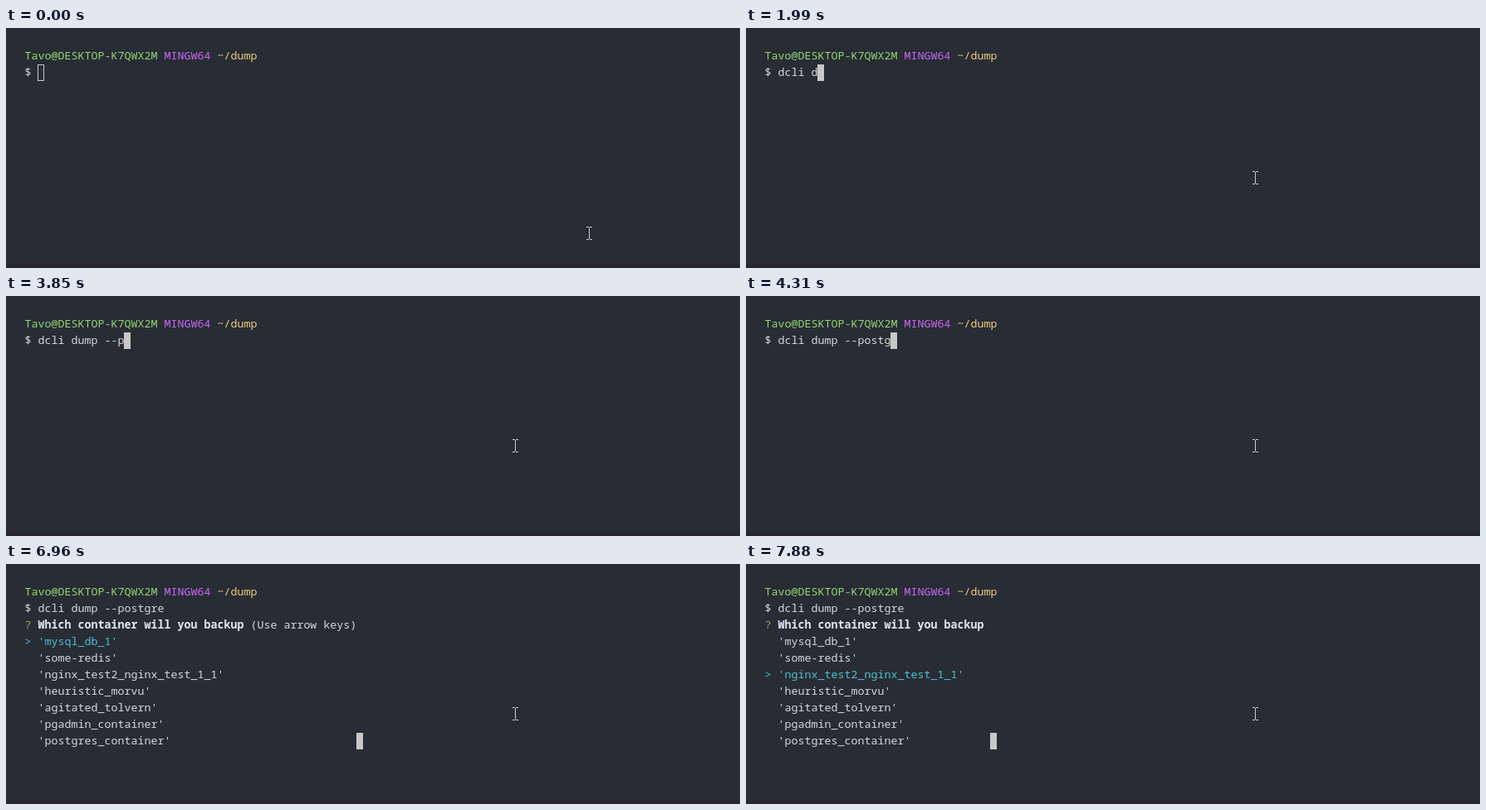
An HTML page for the animation above (8000 ms loop, 884x290 px).

```html
<!DOCTYPE html>
<html lang="en">
<head>
<meta charset="utf-8">
<title>Terminal backup prompt</title>
<style>
  html, body { margin: 0; width: 100%; height: 100%; overflow: hidden; background: #282c34; }
  #stage { position: relative; width: 884px; height: 290px; overflow: hidden; background: #282c34; }
  #stage::after { content: ""; position: absolute; inset: 286px 0 0; background: #26252e; }
  pre {
    position: absolute; left: 22.5px; top: 23px; margin: 0; color: #d8d8d8;
    font: 500 13.3333px/20px "Noto Sans Mono", "DejaVu Sans Mono", monospace;
    font-variant-ligatures: none;
  }
  b { color: #e2e6f4; }
  .user { color: #94d674; }
  .shell { color: #cc68f8; }
  .path { color: #f0cb7c; }
  .mark { color: #a0a078; }
  .active { color: #50bfd4; }
  #caret { position: absolute; width: 8px; height: 20px; box-sizing: border-box; border: 1px solid #c8c8c8; }
  #caret.focused { background: #c8c8c8; }
  #mouse { position: absolute; left: -3px; top: -8px; }
</style>
</head>
<body>
<div id="stage">
  <div id="caret"></div>
  <pre><span class="user">Tavo@DESKTOP-K7QWX2M</span> <span class="shell">MINGW64</span> <span class="path">~/dump</span>
$ <span id="command"></span>
<span id="menu"></span></pre>
  <svg id="mouse" width="7" height="16" shape-rendering="crispEdges">
    <path fill="#cfcfcf" d="M0 0h3v1h-3zM4 0h3v1h-3zM3 1h1v14h-1zM0 15h3v1h-3zM4 15h3v1h-3z"/>
  </svg>
</div>
<script>
const LOOP = 8000, FOCUS = 290, ENTER = 4860, MENU = 6960, REDRAW = 7650, SETTLE = 7720;
const COMMAND = 'dcli dump --postgre';
const ITEMS = ['mysql_db_1', 'some-redis', 'nginx_test2_nginx_test_1_1', 'heuristic_morvu',
  'agitated_tolvern', 'pgadmin_container', 'postgres_container'];

// [time, text on the command line]; a mistyped letter is erased before "dump" goes on
const keys = [[0, '']];
const typeAt = (time, length) => keys.push([time, COMMAND.slice(0, length)]);
[660, 810, 980, 1130, 1280, 1990].forEach((time, i) => typeAt(time, i + 1));
keys.push([2140, 'dcli dm']);
typeAt(2450, 6);
[2680, 2830, 3000, 3620, 3700, 3850, 4010, 4080, 4230, 4310, 4480, 4630]
  .forEach((time, i) => typeAt(time, i + 8));

const selections = [[0, 0], [REDRAW, 1], [7880, 2]];
const mousePath = [[0, [702, 248]], [70, [680, 231]], [140, [638, 199]], [220, [613, 181]]];

const $ = id => document.getElementById(id);
const caret = $('caret'), command = $('command'), menu = $('menu'), mouse = $('mouse');
const at = (steps, t) => steps.findLast(([time]) => time <= t)[1];

function menuMarkup(t) {
  if (t < MENU) return '';
  const selected = at(selections, t);
  const rows = ITEMS.map((name, i) =>
    i === selected ? `<span class="active">&gt; '${name}'</span>` : `  '${name}'`);
  const hint = t < REDRAW ? ' (Use arrow keys)' : '';
  return `<span class="mark">?</span> <b>Which container will you backup</b>${hint}\n` + rows.join('\n');
}

function caretCell(t, text) {
  if (t < ENTER) return [2 + text.length, 1];
  if (t < MENU) return [0, 2];
  return [t < SETTLE ? 50 : 34, 9];
}

let shownMenu = '';
function render(t) {
  const text = at(keys, t), markup = menuMarkup(t);
  command.textContent = text;
  if (markup !== shownMenu) menu.innerHTML = shownMenu = markup;

  const [column, row] = caretCell(t, text);
  caret.style.transform = `translate(${22 + 8 * column}px, ${24 + 20 * row}px)`;
  caret.classList.toggle('focused', t >= FOCUS);

  const [x, y] = at(mousePath, t);
  mouse.style.transform = `translate(${x}px, ${y}px)`;
}

const start = performance.now();
function tick() {
  render((performance.now() - start) % LOOP);
  requestAnimationFrame(tick);
}
tick();
</script>
</body>
</html>
```
